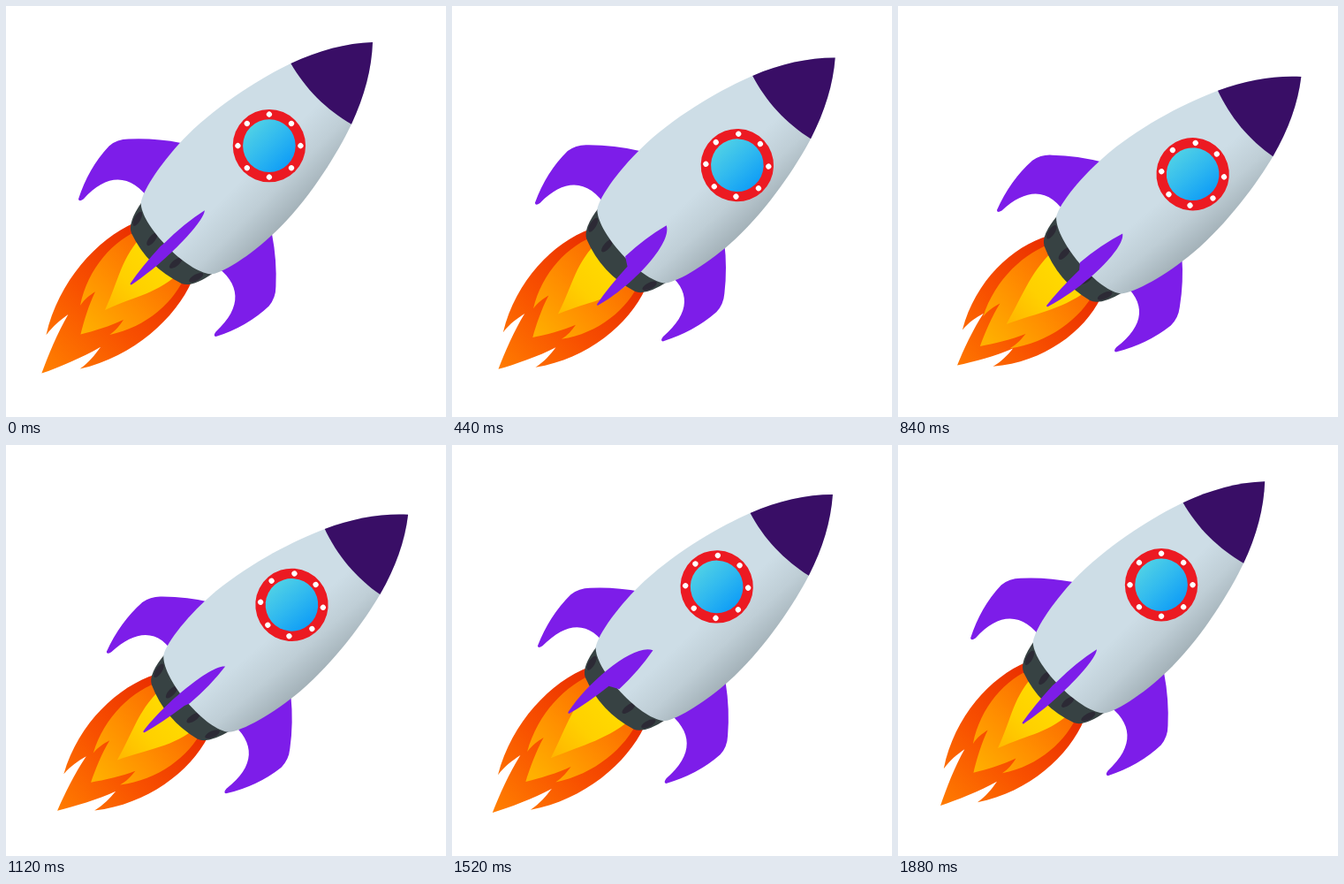
Write an HTML page with a canvas that moves like this. It is 498x465 px and loops after 1.92 s.

```html
<!DOCTYPE html>
<html lang="en">
<head>
<meta charset="utf-8">
<title>Rocket</title>
<style>
html, body { margin: 0; width: 100%; height: 100%; overflow: hidden; background: #fff; }
canvas { display: block; }
</style>
</head>
<body>
<canvas id="stage" width="498" height="465"></canvas>
<script>
const ctx = document.getElementById('stage').getContext('2d');
const LOOP = 1920, STEP = 40, TAU = Math.PI * 2;
const PURPLE = '#7d1de9';

// The rocket is drawn upright with its nose tip at the origin.
// Each half outline is a chain of cubic points, mirrored on the axis.
function mirror(half) {
  const back = half.slice(0, -1).reverse().map(([x, y]) => [-x, y]);
  const p = half.concat(back), path = new Path2D();
  path.moveTo(...p[0]);
  for (let i = 1; i + 2 < p.length; i += 3) path.bezierCurveTo(...p[i], ...p[i + 1], ...p[i + 2]);
  path.closePath();
  return path;
}

const noseSide = [[0, 0], [-20.5, 22], [-36.6, 49.5], [-48.5, 82.5]];
const nose = mirror([...noseSide, [-34, 86.5], [-16, 89], [0, 89]]);
const hull = mirror([...noseSide,
  [-60, 115], [-73.5, 170], [-74, 222],
  [-74, 262], [-66, 302], [-57, 314],
  [-49, 322], [-28, 328], [0, 328]]);
const nozzle = new Path2D('M-57 312 Q-52 341 -40 346 Q0 360 40 346 Q52 341 57 312 Z');
const sideFin = new Path2D('M-50 225 L-72.8 234 Q-98 251 -118 273 Q-127 282 -128 294' +
  ' Q-127 328 -110 361 Q-107 363 -106 357 C-108 316 -88 298 -50 305 Z');

function gradient(x0, y0, x1, y1, ...colors) {
  const g = ctx.createLinearGradient(x0, y0, x1, y1);
  colors.forEach((c, i) => g.addColorStop(i / (colors.length - 1), c));
  return g;
}
const hullFill = gradient(5, 0, 74, 0, '#cddde6', '#bfced6', '#a3b1b8');
const glassFill = gradient(-30, 0, 30, 0, '#4fd0e6', '#30b9ef', '#109ef6');
const outerFill = gradient(0, 340, 0, 520, '#ea2f00', '#f85000', '#ff7d00');
const midFill = gradient(0, 340, 0, 465, '#fb6a00', '#ff8e00', '#ffb000');
const coreFill = gradient(0, 340, 0, 435, '#ffdc00', '#ffd000', '#ffb400');

const mix = (a, b, x) => a + (b - a) * (1 - Math.cos(Math.PI * x)) / 2;
const wave = (t, period) => Math.sin(TAU * t / period);

// Eases from rest to the right, over to the left and back to rest.
function sway(t, right, left, size) {
  const rest = LOOP - STEP;
  if (t < right) return mix(0, size, t / right);
  if (t < left) return mix(size, -size, (t - right) / (left - right));
  return mix(-size, 0, (t - left) / (rest - left));
}

function fill(path, style) {
  ctx.fillStyle = style;
  ctx.fill(path);
}

function flipped(scale, paint) {
  ctx.save();
  ctx.scale(scale, 1);
  paint();
  ctx.restore();
}

function disc(x, y, r, style) {
  ctx.beginPath();
  ctx.arc(x, y, r, 0, TAU);
  ctx.fillStyle = style;
  ctx.fill();
}

// One flame layer: a belly, a barb on each side and a long tip.
function flame(width, barb, end, style) {
  const top = 335, at = k => 340 + (end - 340) * k;
  fill(mirror([[0, top], [-10, top], [-20, top], [-width, top],
    [-width * 1.37, at(0.2)], [-width * 1.31, at(0.54)], [-barb, at(0.82)],
    [-barb * 1.07, at(0.75)], [-barb * 1.03, at(0.7)], [-barb * 0.96, at(0.64)],
    [-barb * 0.74, at(0.76)], [-barb * 0.33, at(0.9)], [0, end]]), style);
}

function drawFire(t) {
  const end = 522 + 9 * wave(t + 40, 240) + 6 * wave(t, 480);
  const mid = 471 + 5 * wave(t - 30, 240), core = mid - 39;
  flame(46, 27, end, outerFill);
  flame(36, 23.5, mid, midFill);
  fill(new Path2D(`M-30 335 C-29 375 -14 ${core - 38} 0 ${core}
    C14 ${core - 38} 29 375 30 335 Z`), coreFill);
}

function drawNozzle() {
  fill(nozzle, '#374243');
  ctx.save();
  ctx.clip(nozzle);
  ctx.fillStyle = '#2c2a35';
  for (const x of [-47, -19, 19, 47]) {
    ctx.beginPath();
    ctx.ellipse(x, 337 - Math.abs(x) * 0.16, 3.6, 9, x * 0.006, 0, TAU);
    ctx.fill();
  }
  ctx.restore();
}

function drawWindow(roll) {
  ctx.save();
  ctx.translate(roll, 165.6 - 0.12 * roll);
  disc(0, 0, 41.2, '#ec1a22');
  disc(0, 0, 29.8, glassFill);
  for (let a = 0; a < TAU; a += TAU / 8) disc(35.5 * Math.cos(a), 35.5 * Math.sin(a), 3.1, '#fff');
  ctx.restore();
}

function drawFrontFin(swing) {
  const f = Math.abs(swing), base = 0.43 * f;
  const fin = new Path2D(`M${base} 269
    C${0.9 * f + 9} 278 ${1.05 * f + 10} 345 ${f + 1} 387
    Q${f} 388.5 ${f - 1} 387
    Q${0.95 * f - 5} 365 ${0.9 * f - 6.5} 333
    L${base - 6} 327
    Q${base - 6} 296 ${base} 269 Z`);
  flipped(swing < 0 ? -1 : 1, () => fill(fin, PURPLE));
}

function draw(t) {
  const drift = mix(0, 1, 2 * t / LOOP);
  const roll = sway(t, 480, 1450, 14.3);
  const swing = sway(t, 520, 1580, 24);
  const lean = 0.045 * roll / 14.3;
  const left = Math.min(1, 1 - 0.06 * drift + lean);
  const right = Math.min(1, 1 - 0.04 * drift - lean);

  ctx.setTransform(1, 0, 0, 1, 0, 0);
  ctx.fillStyle = '#fff';
  ctx.fillRect(0, 0, 498, 465);
  ctx.translate(415 + 43 * drift, 41 + 40.5 * drift);
  ctx.rotate((45 + 5.2 * drift) * Math.PI / 180);

  for (const side of [left, -right]) flipped(side, () => fill(sideFin, PURPLE));
  drawFire(t);
  drawNozzle();
  fill(hull, hullFill);
  fill(nose, '#390e66');
  drawWindow(roll);
  drawFrontFin(swing);
}

const start = performance.now();
function tick() {
  const t = (performance.now() - start) % LOOP;
  draw(Math.floor(t / STEP) * STEP);
  requestAnimationFrame(tick);
}
tick();
</script>
</body>
</html>
```
